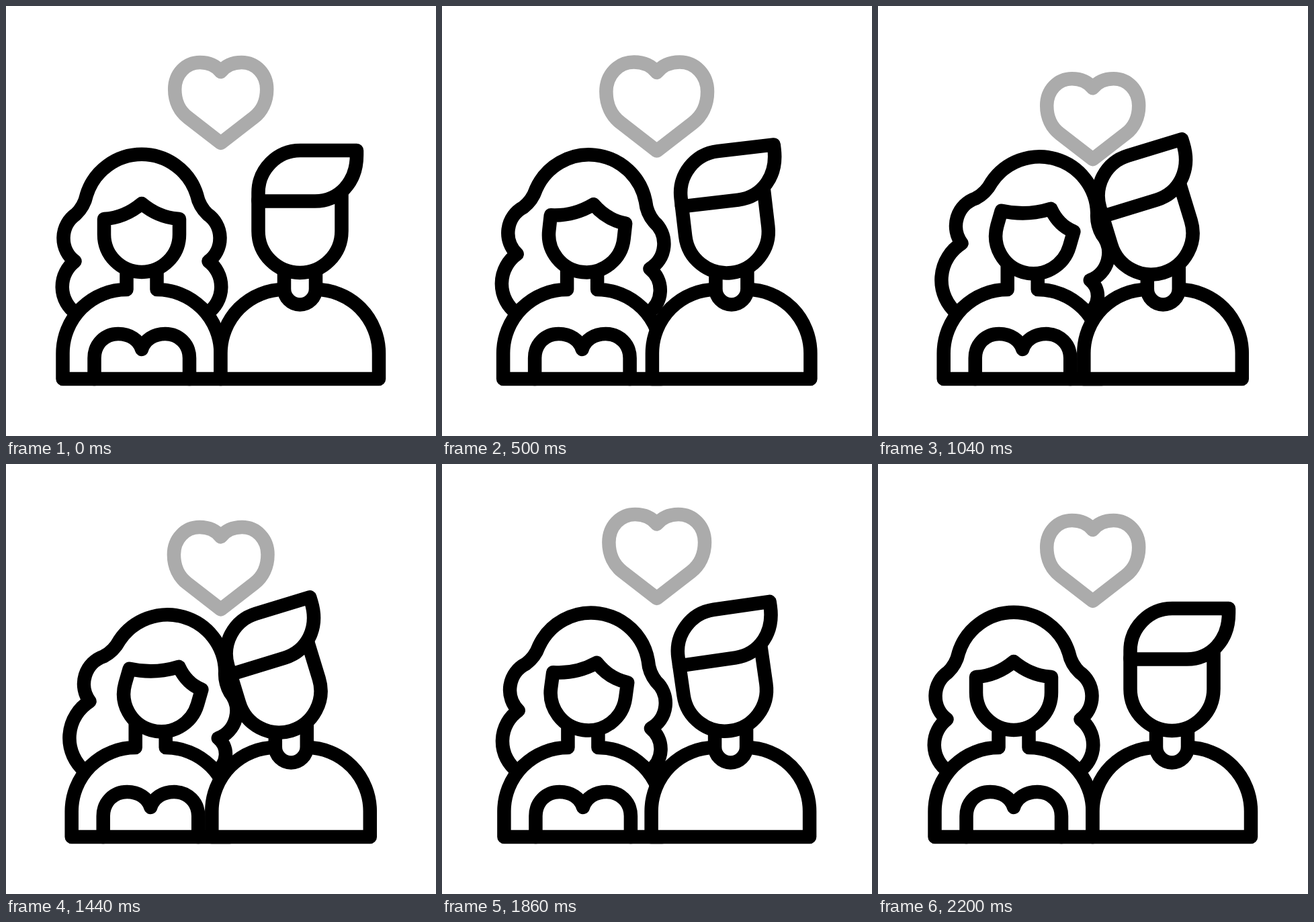
These frames come from a looping animation (640 by 640 pixels, 2400 ms). An HTML page:

```html
<!DOCTYPE html>
<html lang="en">
<head>
<meta charset="utf-8">
<title>Couple</title>
<style>
  html, body { margin: 0; width: 100%; height: 100%; overflow: hidden; background: #fff; }
  svg { display: block; width: 100vw; height: 100vh; }
  path { fill: none; stroke: #000; stroke-width: 20.5; stroke-linejoin: round; stroke-linecap: round; }
  .solid { fill: #fff; }
  #heart { stroke: #ababab; }
</style>
</head>
<body>
<svg viewBox="0 0 640 640">
  <path id="heart" d="M320 98C313 89 302 84 289 84C268 84 251.5 101 251.5 124C251.5 142 259 157 271 166L320 204L369 166C381 157 388.5 142 388.5 124C388.5 101 372 84 351 84C338 84 327 89 320 98Z"/>

  <path id="hair"/>
  <g id="herBody">
    <path class="solid" d="M179.5 382V422A95 95 0 0 0 84.5 517V555H319.5V517A95 95 0 0 0 224.5 422V382"/>
    <path d="M131.5 555V524C131.5 503 147 488 167 488C184 488 198 497 202 511C206 497 220 488 237 488C257 488 273 503 273 524V555"/>
  </g>
  <path id="face" class="solid"/>

  <g id="hisBody">
    <path class="solid" d="M414 422A94.5 95 0 0 0 319.5 517V555H555V517A94 95 0 0 0 461 422"/>
    <path class="solid" d="M414 384V421A23.5 23.5 0 0 0 461 421V384"/>
  </g>
  <g id="hisHead">
    <path class="solid" d="M375.5 288V335A62 62 0 0 0 499.5 335V278"/>
    <path class="solid" d="M375.5 290.5H460C496 290 522 262 522 222V215H438A62.5 63 0 0 0 375.5 278Z"/>
  </g>
</svg>
<script>
const LOOP = 2400, STEP = 20, START = 200, END = 2200;
const SHIFT = 13.2, HER_LEAN = 16, HIS_LEAN = 17;
const HER = { x: 202, y: 398 }, HIM = { x: 437.5, y: 396 };
const el = id => document.getElementById(id);
const set = (id, name, value) => el(id).setAttribute(name, value);

// Cubic ease with value handles a and b; the default is a smooth in-out.
const ease = (u, a = 0, b = 1) => 3 * (1 - u) ** 2 * u * a + 3 * (1 - u) * u * u * b + u ** 3;
const clamp = u => Math.max(0, Math.min(1, u));
const mix = (a, b, u) => a + (b - a) * u;

// Goes from 0 to 1 after START and back to 0 just before END.
const sway = (t, rise) => ease(clamp(Math.min(t - START, END - t) / rise));

// The heart sinks, bounces up past its place, then settles.
function heartDrop(t) {
  const low = 26, high = -12.8;
  if (t < 1200) return low * ease(clamp((t - START) / 1000));
  if (t < 1700) return mix(low, high, ease((t - 1200) / 500, 0, 0.75));
  return mix(high, 0, ease(clamp((t - 1700) / 500), 0.55, 1));
}

// Two beats, a rest, two more.
function heartScale(t) {
  const still = t < START || t > END || (t > 1000 && t < 1400);
  return still ? 1 : 1 + 0.2 * Math.sin(Math.PI * (t - START) / 400) ** 2;
}

// Joins of the left locks, from shoulder to crown, and the arc radius per chord after each.
const joins = [[104, 457], [102.5, 380], [104, 310], [120, 281]];
const bends = [0.62, 0.62, -1.7, 0.524];
const hairJoins = [...joins, ...joins.map(([x, y]) => [2 * HER.x - x, y]).reverse()];

function hairPath(dx, angle) {
  const a = angle * Math.PI / 180, c = Math.cos(a), s = Math.sin(a), last = hairJoins.length - 1;
  const pts = hairJoins.map(([x, y], i) => {
    // The ends stay on the shoulders, the rest turns with the head.
    if (i === 0 || i === last) return [x + dx, y];
    const px = x - HER.x, py = y - HER.y;
    return [HER.x + dx + px * c - py * s, HER.y + px * s + py * c];
  });
  return pts.reduce((d, [x, y], i) => {
    if (i === 0) return `M${x} ${y}`;
    const [x0, y0] = pts[i - 1], bend = bends[Math.min(i - 1, last - i)];
    const r = Math.abs(bend) * Math.hypot(x - x0, y - y0);
    return `${d}A${r} ${r} 0 0 ${bend > 0 ? 1 : 0} ${x} ${y}`;
  }, '');
}

// The parting slides sideways as the head turns.
function facePath(lean) {
  const left = 146, right = 258, part = HER.x + 14 * lean;
  return `M${part} 294Q${(part + left) / 2 + 3} 315 ${left} 317V340A56 56 0 0 0 ${right} 340V317` +
         `Q${(part + right) / 2 - 3} 315 ${part} 294Z`;
}

const place = (id, dx, angle = 0, p = HER) =>
  set(id, 'transform', `translate(${dx} 0) rotate(${angle} ${p.x} ${p.y})`);

function draw(t) {
  const dx = SHIFT * sway(t, 600), lean = sway(t, 700), beat = heartScale(t);
  place('herBody', dx);
  place('face', dx, HER_LEAN * lean);
  place('hisBody', -dx);
  place('hisHead', -dx, -HIS_LEAN * lean, HIM);
  set('face', 'd', facePath(lean));
  set('hair', 'd', hairPath(dx, HER_LEAN * lean));
  set('heart', 'transform',
    `translate(319.7 ${144 + heartDrop(t)}) scale(${beat}) translate(-320 -144)`);
  el('heart').style.strokeWidth = 20.5 / beat;
}

function tick() {
  draw(Math.floor(performance.now() % LOOP / STEP) * STEP);
  requestAnimationFrame(tick);
}
tick();
</script>
</body>
</html>
```
